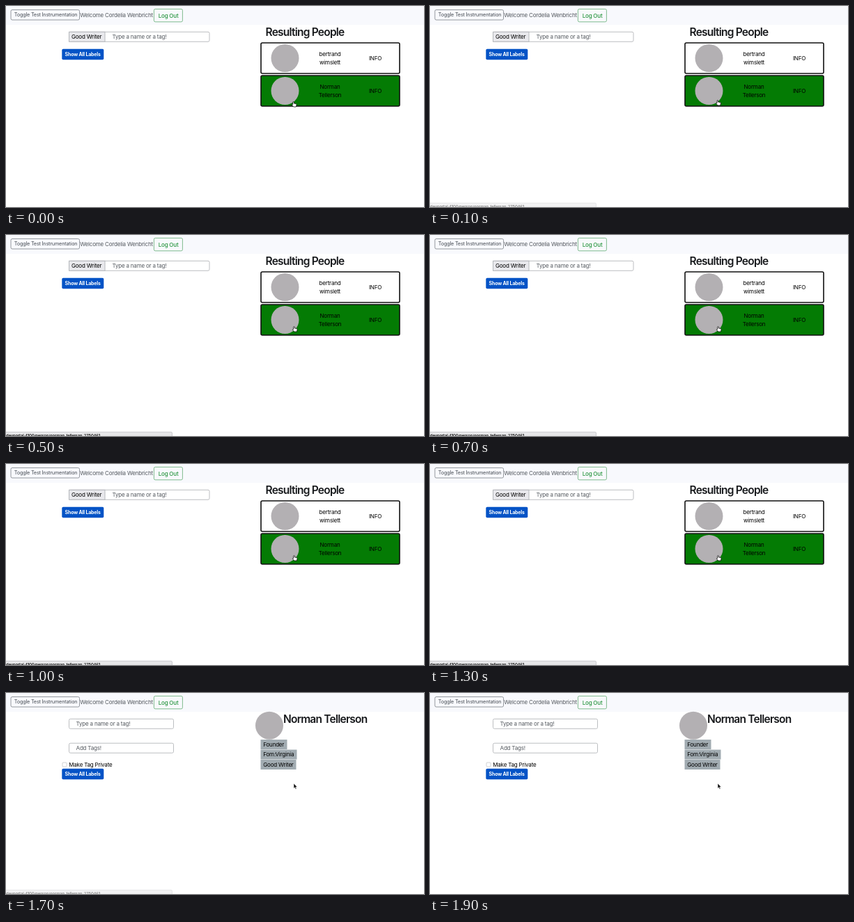
Recreate the animation shown at these times as an HTML page. Size 600 px wide and 289 px high, loop 2000 ms.

```html
<!DOCTYPE html>
<html lang="en">
<head>
<meta charset="utf-8">
<title>People search</title>
<style>
  html, body { margin: 0; width: 100%; height: 100%; overflow: hidden; background: #fff; }
  svg { display: block; width: 100%; height: 100%; }
  text { font: 8px Inter, sans-serif; letter-spacing: -.025em; fill: #000; }
  .small { font-size: 7.25px; fill: #484e54; }
  .muted { fill: #54595f; }
  .green { fill: #28963f; font-weight: 500; }
  .strong { font-size: 7px; font-weight: 700; fill: #fff; }
  .title { font-size: 15.5px; font-weight: 600; letter-spacing: -.05em; fill: #17191c; }
  .center { text-anchor: middle; }
  .status { font-size: 5.9px; font-weight: 500; }
  .field { fill: #fff; stroke: #bcbec1; }
  .avatar { fill: #b3b0b3; }
  .tag { fill: #a1abb1; }
  .card { stroke: #111; stroke-width: 1.6; }
</style>
</head>
<body>
<svg viewBox="0 0 600 289">
  <defs>
    <g id="labels-button">
      <rect x="80.3" y="-.2" width="60" height="15.4" rx="1.8" fill="#0453c6"/>
      <text class="strong" x="84.6" y="10.2">Show All Labels</text>
    </g>
  </defs>

  <rect width="600" height="27" fill="#f8f9fd"/>
  <rect x="7" y="5.5" width="98.5" height="14.5" rx="2" fill="none" stroke="#7b8187" stroke-width=".8"/>
  <text class="small" x="11.8" y="15.4">Toggle Test Instrumentation</text>
  <text class="muted" x="106.3" y="15.6">Welcome Cordelia Wenbricht</text>
  <rect x="212.4" y="4.4" width="41" height="18.4" rx="2" fill="none" stroke="#62ad72" stroke-width=".8"/>
  <text class="green" x="218.7" y="16.5">Log Out</text>

  <g id="results">
    <rect class="field" x="90.5" y="37.3" width="201.5" height="14" rx="2"/>
    <rect x="90.5" y="37.3" width="51.5" height="14" fill="#e9e9ed" stroke="#b4b7bb"/>
    <text x="94" y="47.3">Good Writer</text>
    <text class="muted" x="152.5" y="47.3">Type a name or a tag!</text>
    <use href="#labels-button" y="62"/>
    <text class="title" x="372.5" y="42.8">Resulting People</text>

    <rect class="card" x="366" y="53" width="199" height="44" rx="2" fill="#fff"/>
    <circle class="avatar" cx="400.5" cy="75" r="20"/>
    <text class="center" x="465" y="71.6">bertrand</text>
    <text class="center" x="465" y="83.6">wimslett</text>
    <text class="center" x="530" y="77.8">INFO</text>

    <rect class="card" x="366" y="100" width="199" height="44" rx="2" fill="#047b04"/>
    <circle class="avatar" cx="400.5" cy="122" r="20"/>
    <text class="center" x="465" y="118.9">Norman</text>
    <text class="center" x="465" y="130.9">Tellerson</text>
    <text class="center" x="530" y="125">INFO</text>
  </g>

  <g id="profile">
    <rect class="field" x="90.5" y="37.3" width="150" height="14" rx="2"/>
    <text class="muted" x="100.6" y="47.3">Type a name or a tag!</text>
    <rect class="field" x="90.5" y="72.2" width="150" height="14" rx="2"/>
    <text class="muted" x="100.6" y="82">Add Tags!</text>
    <rect class="field" x="81" y="100" width="6" height="6" rx="1" stroke-width=".7"/>
    <text x="90.3" y="105.7">Make Tag Private</text>
    <use href="#labels-button" y="109"/>

    <circle class="avatar" cx="378" cy="46.7" r="20"/>
    <text class="title" x="398" y="42.8">Norman Tellerson</text>
    <rect class="tag" x="365.5" y="67" width="38" height="14"/>
    <rect class="tag" x="365.5" y="81.5" width="52" height="14"/>
    <rect class="tag" x="365.5" y="96" width="51" height="14"/>
    <text x="369.3" y="76.9">Founder</text>
    <text x="369.3" y="91.3">Fom:Virginia</text>
    <text x="369.3" y="105.7">Good Writer</text>
  </g>

  <g id="status">
    <rect x="-2" y="283.3" width="240.5" height="8" rx="1.5" fill="#e6e6e8" stroke="#bebec0" stroke-width=".7"/>
    <text class="status" x="0" y="290.5">devportal:4100/person/norman-tellerson-2750461</text>
  </g>

  <path id="hand" fill="#fff" stroke="#111" stroke-width=".8" stroke-linejoin="round"
    d="M2 4.6V1q.8-1 1.6 0v2l3 .6q.9.3.8 1.5L6.7 8H3L.6 5.2q.2-1 1.4-.6z"/>
  <path id="arrow" fill="#111" stroke="#fff" stroke-width=".5"
    d="M413 130v7.2l1.6-1.5 1.1 2.6 1.2-.5-1.1-2.5h2.2z"/>
</svg>
<script>
  const LOOP = 2000, PAGE_CHANGE = 1400, ARROW_START = 1500;
  const part = id => document.getElementById(id);
  const show = (id, visible) => part(id).style.display = visible ? '' : 'none';
  const progress = (t, start, end) => Math.min(1, Math.max(0, (t - start) / (end - start)));

  function draw(now) {
    const t = now % LOOP;
    show('results', t < PAGE_CHANGE);
    show('profile', t >= PAGE_CHANGE);
    show('hand', t < ARROW_START);
    show('arrow', t >= ARROW_START);

    const move = progress(t, 0, 300);
    part('hand').setAttribute('transform', `translate(${409.7 + move} ${137 - 6 * move})`);
    part('status').style.opacity = progress(t, 0, 200) * (1 - progress(t, 1600, 1800));
    requestAnimationFrame(draw);
  }
  requestAnimationFrame(draw);
</script>
</body>
</html>
```
